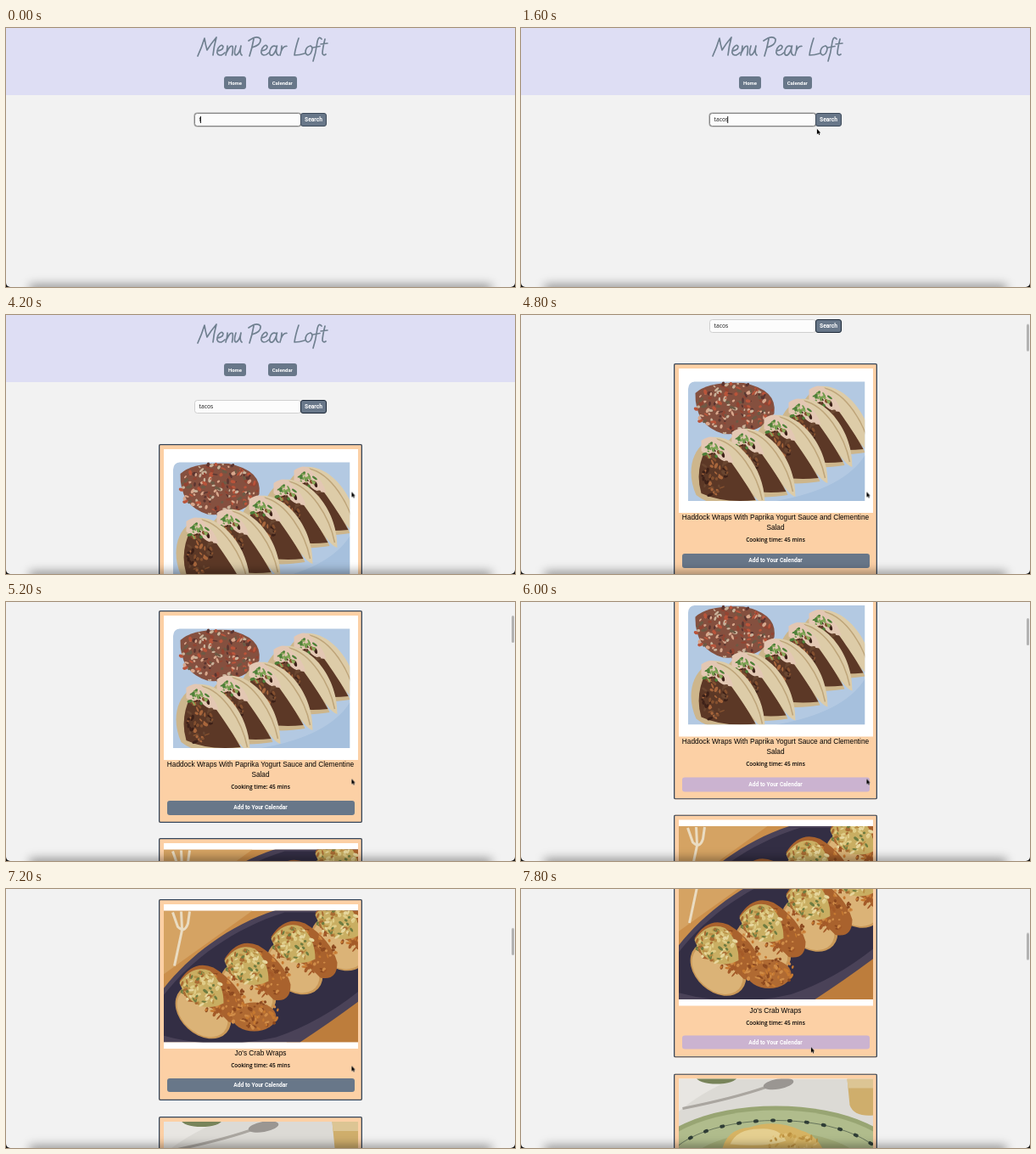
An HTML page for the animation above (8 s loop, 600 by 305 pixels).

```html
<!DOCTYPE html>
<html lang="en">
<head>
<meta charset="utf-8">
<title>Menu Pear Loft</title>
<style>
@property --s { syntax: "<number>"; inherits: true; initial-value: 0; }

html, body { margin: 0; width: 100%; height: 100%; overflow: hidden; }
.stage {
  position: relative; width: 600px; height: 305px; overflow: hidden;
  background: #f2f2f2; animation: scroll 8s step-end infinite;
}
.stage * { box-sizing: border-box; }
.page { position: absolute; inset: 0; transform: translateY(calc(var(--s) * -1px)); }
.page > *, .card > * { position: absolute; }
header { left: 0; top: 0; width: 600px; height: 78.5px; background: #dedef4; }
header > * { position: absolute; }
.title { left: 0; top: 0; fill: none; stroke: #708090; stroke-width: 1.7; stroke-linecap: round; stroke-linejoin: round; }

.btn {
  display: flex; align-items: center; justify-content: center;
  background: #687789; color: #fff; border-radius: 3px;
  font: bold 6px Roboto, sans-serif; white-space: nowrap;
}
.nav { top: 57px; height: 15px; }
.field {
  left: 222px; top: 99.5px; width: 125.5px; height: 16.5px; padding-left: 4.5px;
  background: #fcfcfc; border: 1px solid #cfcfcf; border-radius: 3.5px;
  font: 6.7px/14.5px "Noto Sans", "Open Sans", sans-serif; color: #222;
  animation: focus 8s step-end infinite;
}
.field span { animation: 8s step-end infinite; }
.caret {
  left: 229.4px; top: 103.5px; width: .7px; height: 8.5px; background: #222;
  animation: caret 8s step-end infinite;
}
.search {
  left: 347px; top: 99.5px; width: 31px; height: 16.5px;
  border: 1px solid #2b3848; font-size: 6.7px;
  animation: press 8s step-end infinite;
}

.results { left: 180px; top: 0; animation: show 8s step-end infinite; }
.card {
  position: absolute; width: 240px; background: #fcd0a5; border-radius: 2px;
  box-shadow: inset 0 0 0 1.3px #34465c; text-align: center; color: #000;
}
.card svg { left: 5.5px; top: 6px; width: 229px; height: 170px; background: #fff; }
.name { left: 0; top: 176px; width: 240px; font: 8.3px/11.6px "Liberation Sans", Arial, sans-serif; white-space: nowrap; }
.time { left: 0; width: 240px; font: 600 6.55px/10px "Open Sans", "Noto Sans", sans-serif; }
.add { left: 9.5px; width: 221px; height: 16.5px; font-size: 6.65px; }
.add.one { animation: hover1 8s step-end infinite; }
.add.two { animation: hover2 8s step-end infinite; }

.thumb {
  position: absolute; right: 1px; top: 0; width: 3px; height: 32px;
  border-radius: 2px; background: #b2b2b2;
  transform: translateY(calc(var(--s) * .1125px));
  animation: thumb 8s step-end infinite;
}
.shade {
  position: absolute; left: 32px; right: 32px; bottom: -5px; height: 4px;
  box-shadow: 0 0 12px 4px #0006;
}
.frame {
  position: absolute; inset: -12px 0 0; border-radius: 0 0 5px 5px;
  box-shadow: 0 0 0 9px #111;
}
.cursor {
  position: absolute; left: -.5px; top: -.2px; width: 7px; height: 9.6px;
  animation: cursor 8s step-end infinite;
}

@keyframes scroll {
  0%, 52.5% { --s: 0 }
  55% { --s: 16 }   57.5% { --s: 56 }  60% { --s: 95 }
  62.5% { --s: 122 } 65% { --s: 142 }  67.5% { --s: 156 }
  70% { --s: 164 }  72.5% { --s: 168.5 } 75% { --s: 169.5 }
  77.5% { --s: 172 } 80% { --s: 200 }  82.5% { --s: 264 }
  85% { --s: 318.5 } 87.5% { --s: 368 } 90% { --s: 408 }
  92.5% { --s: 437 } 95% { --s: 454 }  97.5%, to { --s: 458.5 }
}
@keyframes key2 { 0% { visibility: hidden } 2.5%, to { visibility: visible } }
@keyframes key3 { 0% { visibility: hidden } 5%, to { visibility: visible } }
@keyframes key4 { 0% { visibility: hidden } 7.5%, to { visibility: visible } }
@keyframes caret {
  0% { transform: none } 2.5% { transform: translateX(3.7px) }
  5% { transform: translateX(6.9px) }
  7.5% { transform: translateX(14.2px); opacity: 1 }
  25%, to { opacity: 0 }
}
@keyframes focus {
  0% { border-color: #858585; box-shadow: 0 0 0 .6px #a5a5a5 }
  25%, to { border-color: #cfcfcf; box-shadow: none }
}
@keyframes press {
  0% { border-color: #3d4a5a }
  25%, to { border-color: #1b2736 }
}
@keyframes show { 0% { visibility: hidden } 45%, to { visibility: visible } }
@keyframes thumb { 0% { opacity: 0 } 55%, to { opacity: 1 } }
@keyframes hover1 {
  0%, 80%, to { background: #687789 }
  72.5% { background: #cbb3d0 }
}
@keyframes hover2 { 0% { background: #687789 } 97.5%, to { background: #cbb3d0 } }
@keyframes cursor {
  0% { transform: translate(250px, 180px); opacity: 0 }
  12.5% { transform: translate(262px, 172px); opacity: 1 }
  15% { transform: translate(288px, 155px) }
  17.5% { transform: translate(322px, 135px) }
  20% { transform: translate(348px, 118px) }
  22.5% { transform: translate(360px, 110px) }
  25% { transform: translate(363px, 107px) }
  35% { transform: translate(363px, 118px) }
  37.5% { transform: translate(363px, 140px) }
  40% { transform: translate(363px, 156px) }
  42.5% { transform: translate(374px, 172px) }
  45% { transform: translate(392px, 194px) }
  47.5% { transform: translate(404px, 205px) }
  50% { transform: translate(406.5px, 207.5px) }
  95% { transform: translate(368px, 196px) }
  97.5%, to { transform: translate(341px, 185.5px); opacity: 1 }
}
</style>
</head>
<body>
<div class="stage">
  <div class="page">
    <header>
      <svg class="title" width="600" height="50" role="img" aria-label="Menu Pear Loft">
        <path d="M226 33Q231 22 234 12Q235 19 237 26Q242 18 248 11Q245 22 244 32
          M249 27q7-1 7-5q-2-4-6 2q-3 7 2 8q3 0 6-3
          M259 32Q261 26 261 21M260.500 28Q264 20 267 21.500Q268 25 266.500 32
          M271 21Q268 31 271 32Q275 31 277 21Q275 30 278 32
          M292 13Q290 24 287 33M286 15Q296 8 300 13Q301 20 290 23
          M301 27q7-1 7-5q-2-4-6 2q-3 7 2 8q3 0 6-3
          M319 22Q313 19 311 27Q310 33 314 32Q318 29 319.500 21Q317 30 321 32
          M325 21Q325 27 323 32M324.500 27Q327 21 331 21.500
          M345 12Q341 24 340 32Q346 32 352 30
          M359 21Q353 22 353 29Q355 34 359 30Q363 23 359 21
          M372 13Q368 8 366.500 19Q365 30 362 39M362 23L370 21.500
          M376 13Q373 25 373 30Q374 33 377 31M371 19L379 18"/>
      </svg>
      <div class="btn nav" style="left:257px;width:26px">Home</div>
      <div class="btn nav" style="left:309px;width:33.500px">Calendar</div>
    </header>
    <div class="field">t<span style="animation-name:key2">a</span><span style="animation-name:key3">c</span><span style="animation-name:key4">os</span></div>
    <i class="caret"></i>
    <div class="btn search">Search</div>

    <div class="results">
      <article class="card" style="top:152px;height:249.500px">
        <svg viewBox="185.500 63 229 170">
          <defs>
            <clipPath id="clip1"><path d="M204 78.500H405V219H196.500V87Q197 79 204 78.500Z"/></clipPath>
            <g id="taco">
              <path d="M-12 6C-30 20-32 46-22 68Q0 86 50 78L20 10Z" fill="#cdb68c"/>
              <path d="M-10 12Q-24 40-16 66Q10 78 48 74L10 8Z" fill="#5c3826"/>
              <path d="M-4 0C26-4 60 36 59 80C46 76 34 44 -4 0Z" fill="#ddcca8"/>
              <path d="M2 2C28 8 50 44 56 74" fill="none" stroke="#bea57a" stroke-width="1.500"/>
              <path d="M-16 4Q-2-6 6 6Q18 16 22 30Q6 30 0 18Q-10 22-16 16Z" fill="#e3c7b3"/>
              <g data-box="0 42 15 28" data-n="60" data-c="#84502f #3d2118 #a8663c #6a4630"/>
              <g data-box="-2 16 12 9" data-n="20" data-c="#6f9a4b #4f8038 #89a85a"/>
            </g>
          </defs>
          <g clip-path="url(#clip1)">
            <path d="M190 70H410V225H190Z" fill="#b3c9e2"/>
            <path d="M300 219Q380 205 405 165V219Z" fill="#a6c0dd"/>
            <path d="M205 92Q220 78 262 80Q302 88 298 116Q282 142 238 140Q204 130 205 92Z" fill="#85503f"/>
            <g data-box="250 110 46 30" data-n="170" data-c="#b9543a #934432 #d8a78c #6d5a45 #5b3530 #c9b29a"/>
            <use href="#taco" x="355" y="84"/>
            <use href="#taco" x="331" y="99"/>
            <use href="#taco" x="302" y="118"/>
            <use href="#taco" x="264" y="134"/>
            <use href="#taco" x="228" y="144"/>
          </g>
        </svg>
        <div class="name">Haddock Wraps With Paprika Yogurt Sauce and Clementine<br>Salad</div>
        <div class="time" style="top:203px">Cooking time: 45 mins</div>
        <div class="btn add one" style="top:224px">Add to Your Calendar</div>
      </article>

      <article class="card" style="top:420px;height:237px">
        <svg viewBox="185.500 107.500 229 170">
          <defs>
            <clipPath id="clip2"><path d="M185 115H415V270H185Z"/></clipPath>
            <g id="wrap">
              <ellipse cx="-6" cy="22" rx="37" ry="27" transform="rotate(42 -6 22)" fill="#c99858"/>
              <ellipse cx="-7" cy="23" rx="34" ry="24" transform="rotate(42 -7 23)" fill="#dbb377"/>
              <path d="M-34-14Q-18-40 6-30Q36-12 44 16Q44 38 24 34Q4 12-24 10Z" fill="#a9622d"/>
              <g data-box="16 4 26 28" data-n="60" data-c="#c67931 #8d4a20 #d08c48 #a45a28"/>
              <path d="M-34-12Q-18-34 2-26Q18-12 18 12Q2 20-12 14Q-28 6-34-12Z" fill="#c9ae62"/>
              <g data-box="-8 -6 24 20" data-n="80" data-c="#dfcc87 #b98f45 #6f7c40 #e6d69d #a96c33"/>
            </g>
          </defs>
          <g clip-path="url(#clip2)">
            <path d="M185 115H415V270H185Z" fill="#cb8f4b"/>
            <path d="M185 115H290L185 190Z" fill="#d5a363"/>
            <path d="M330 270L415 215V270Z" fill="#bd7d3c"/>
            <path d="M196 117L202 134Q210 142 214 130L216 116M207 138L198 180M206 116L207 136" fill="none" stroke="#eadcc2" stroke-width="3"/>
            <path d="M185 207C215 168 265 130 322 113H415V222Q380 248 346 270H185Z" fill="#4a4258"/>
            <path d="M185 215C218 172 268 136 328 117H415V210Q370 246 318 264Q250 280 185 262Z" fill="#332e44"/>
            <use href="#wrap" x="398" y="132"/>
            <use href="#wrap" x="346" y="160"/>
            <use href="#wrap" x="291" y="186"/>
            <use href="#wrap" x="238" y="212"/>
            <ellipse cx="292" cy="240" rx="26" ry="17" fill="#b06a32"/>
            <g data-box="292 238 30 18" data-n="70" data-c="#c67931 #8d4a20 #d08c48"/>
          </g>
        </svg>
        <div class="name">Jo's Crab Wraps</div>
        <div class="time" style="top:191px">Cooking time: 45 mins</div>
        <div class="btn add two" style="top:210.800px">Add to Your Calendar</div>
      </article>

      <article class="card" style="top:675.500px;height:237px">
        <svg viewBox="185.500 223 229 170">
          <path d="M185 223H415V393H185Z" fill="#dcdad5"/>
          <path d="M185 223H250Q210 240 185 262Z" fill="#e8e6e2"/>
          <ellipse cx="230" cy="221" rx="24" ry="8" fill="#78845a"/>
          <path d="M190 258Q250 246 288 233" fill="none" stroke="#aaa6a0" stroke-width="3"/>
          <ellipse cx="303" cy="229" rx="18" ry="6" transform="rotate(-10 303 229)" fill="#9a9692"/>
          <path d="M384 223H415V266Q392 268 387 254Z" fill="#cfae6c"/>
          <path d="M384 223H415V234H385Z" fill="#dcc594"/>
          <ellipse cx="300" cy="325" rx="152" ry="70" fill="#98a573"/>
          <ellipse cx="300" cy="328" rx="148" ry="68" fill="#b0bc8c"/>
          <ellipse cx="300" cy="330" rx="132" ry="58" fill="none" stroke="#53634f" stroke-width=".8"/>
          <ellipse cx="300" cy="330" rx="132" ry="58" fill="none" stroke="#2f3d36" stroke-width="4" stroke-dasharray="2 18" stroke-linecap="round"/>
          <ellipse cx="300" cy="338" rx="112" ry="53" fill="#a3ad78"/>
          <path d="M236 310Q240 282 270 280Q300 270 330 284Q352 290 360 318V350H236Z" fill="#d6b363"/>
          <path d="M246 300Q254 282 280 282Q304 280 312 296Q288 304 246 300Z" fill="#e5cf90"/>
          <g data-box="318 302 34 15" data-n="45" data-c="#e1c176 #bd9140 #cca34f"/>
        </svg>
      </article>
    </div>
  </div>

  <div class="thumb"></div>
  <div class="shade"></div>
  <div class="frame"></div>
  <svg class="cursor" viewBox="-1 -1 8 11">
    <path d="M0 0V7.200L1.700 5.700 2.900 8.300 4 7.800 2.900 5.300H5Z" fill="#000" stroke="#fff" stroke-width=".6" paint-order="stroke"/>
  </svg>
</div>
<script>
// Fills each marked group with small seeded crumbs inside its ellipse.
let seed = 7;
const rand = () => (seed = seed * 16807 % 2147483647) / 2147483647;

function scatter(group) {
  const [cx, cy, rx, ry] = group.dataset.box.split(" ").map(Number);
  const colors = group.dataset.c.split(" ");
  for (let i = 0; i < +group.dataset.n; i++) {
    const angle = rand() * Math.PI * 2, reach = Math.sqrt(rand());
    const x = cx + rx * reach * Math.cos(angle);
    const y = cy + ry * reach * Math.sin(angle);
    const crumb = document.createElementNS("http://www.w3.org/2000/svg", "ellipse");
    crumb.setAttribute("rx", 1.2 + rand() * 2.4);
    crumb.setAttribute("ry", 0.8 + rand() * 1.3);
    crumb.setAttribute("fill", colors[i % colors.length]);
    crumb.setAttribute("transform", `translate(${x} ${y}) rotate(${rand() * 180})`);
    group.append(crumb);
  }
}
document.querySelectorAll("[data-box]").forEach(scatter);
</script>
</body>
</html>
```
